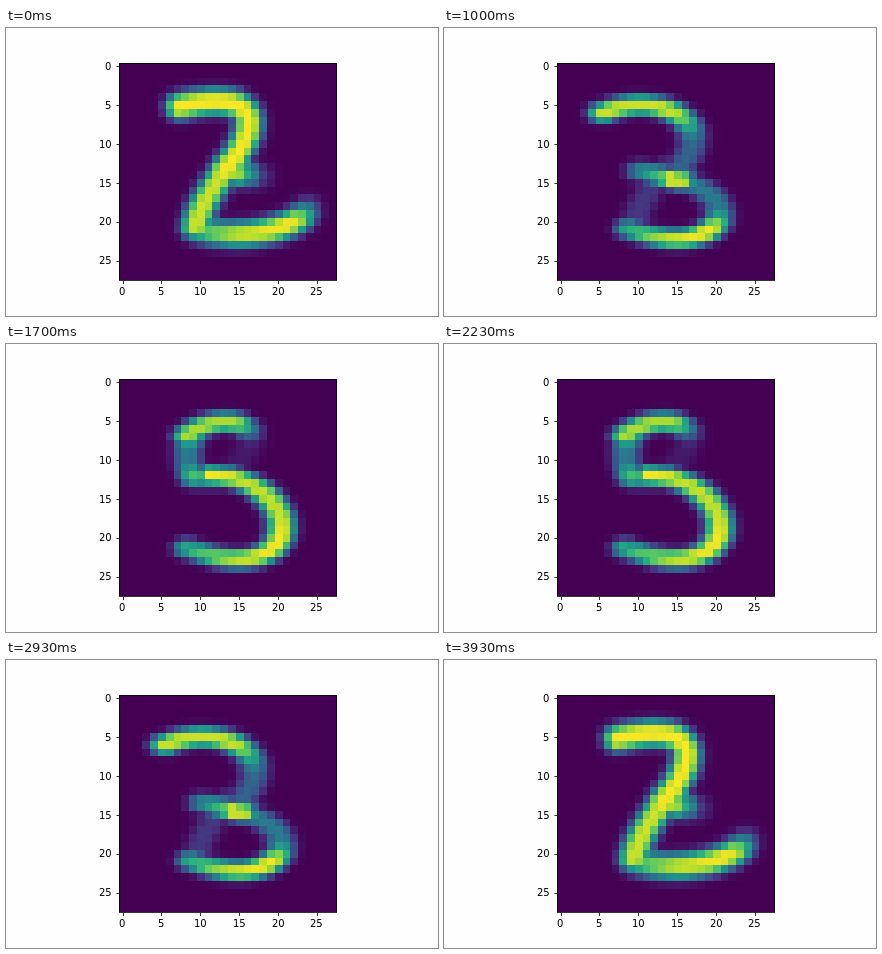
Write an HTML page with a canvas that moves like this. It is 432x288 px and loops after 4.03 s.

```html
<!DOCTYPE html>
<html lang="en">
<head>
<meta charset="utf-8">
<title>Digit morph</title>
<style>
  html, body { margin: 0; width: 100%; height: 100%; overflow: hidden; background: #fefefe; }
  canvas, svg { position: absolute; left: 0; top: 0; width: 432px; height: 288px; }
  text { font: 10px "DejaVu Sans", sans-serif; fill: #000; }
  rect { fill: #000; fill-opacity: .8; }
</style>
</head>
<body>
<canvas id="plot" width="432" height="288"></canvas>
<svg id="axes" viewBox="0 0 432 288"></svg>
<script>
const N = 28, LEFT = 113, TOP = 34, CELL = 218 / N;
const LOOP = 4030, STEP = 100, HALF = 10;

const mix = (a, b, p) => a + (b - a) * p;
const clamp = v => Math.max(0, Math.min(1, v));
const smooth = (from, to, v) => {
  const p = clamp((v - from) / (to - from));
  return p * p * (3 - 2 * p);
};

// Bezier points in grid cells; moving strokes have one set each for the 2, the 3 and the 5.
const strokes = [
  { // top arc, whose lower end fades
    poses: [
      [[7.3, 5.2], [17, 2.9], [18.5, 7], [13, 13.5]],
      [[5.4, 6], [13, 2.8], [21, 7.8], [14.5, 13.8]],
      [[8.6, 7], [12, 3.6], [20.5, 4.6], [13.8, 11]]],
    strength: (u, k) => mix(1, .85, k / 20) - Math.min(.8, .06 * k) * smooth(.4, .8, u)
  },
  { // bowl and foot, whose upper part fills in
    poses: [
      [[13.3, 13.5], [34, 16], [20, 23.8], [9.5, 21]],
      [[14.2, 14.5], [25, 16.5], [20.5, 25.5], [8.7, 20.9]],
      [[11, 11.7], [23.5, 12], [24.5, 27.5], [8.2, 21.4]]],
    strength: (u, k) => {
      const gap = 1 - clamp(k / 18) ** 1.5;
      return (1 - gap * smooth(0, .1, u) * (1 - smooth(.35, .6, u))) * (1 - .4 * u ** 8);
    }
  },
  { // middle bar
    poses: [
      [[12.8, 13.8], [13.2, 13.2]],
      [[10.2, 13.5], [15.4, 14.7]],
      [[9.1, 12.3], [13.5, 11.9]]],
    strength: u => mix(.45, .95, u)
  },
  { // leg of the 2
    poses: [[[13.5, 13], [10.2, 17.2], [9.3, 20.6]]],
    strength: (u, k) => .93 * (1 - (k / 11) ** 2)
  },
  { // stem of the 5
    poses: [[[8.7, 6.9], [7.7, 9.7], [9.1, 12.2]]],
    strength: (u, k) => (k / 10 - 1) * (1 - .45 * Math.sin(Math.PI * u))
  }
];

function pointsAt(poses, k) {
  if (poses.length === 1) return poses[0];
  const i = k < HALF ? 0 : 1;
  const p = Math.sin((k / HALF - i) * Math.PI / 2);
  return poses[i].map((a, n) => a.map((v, axis) => mix(v, poses[i + 1][n][axis], p)));
}

function bezier(pts, u) {
  while (pts.length > 1) {
    pts = pts.slice(1).map((b, n) => b.map((v, axis) => mix(pts[n][axis], v, u)));
  }
  return pts[0];
}

const SAMPLES = 40;
function dabs(k) {
  const out = [];
  for (const { poses, strength } of strokes) {
    const pts = pointsAt(poses, k);
    for (let n = 0; n <= SAMPLES; n++) {
      const u = n / SAMPLES, power = strength(u, k);
      if (power > 0) out.push([...bezier(pts, u), power]);
    }
  }
  return out;
}

const stops = ['440154', '472d7b', '3b528b', '2c728e', '21918c', '28ae80', '5ec962', 'addc30', 'fde725']
  .map(h => [0, 2, 4].map(i => parseInt(h.slice(i, i + 2), 16)));

function colour(v) {
  const s = clamp(v) * (stops.length - 1);
  const i = Math.min(stops.length - 2, Math.floor(s));
  return `rgb(${stops[i].map((c, n) => Math.round(mix(c, stops[i + 1][n], s - i)))})`;
}

const ctx = document.getElementById('plot').getContext('2d');
ctx.rect(113, 35, 218, 217);
ctx.clip();
const edge = (start, i) => Math.round(start + i * CELL);

function draw(k) {
  const ink = dabs(k);
  // A flat pen, wider than tall, that gets thinner on the way to the 3.
  const penX = 1.85, penY = mix(1.7, 1.25, clamp(k / HALF));
  for (let r = 0; r < N; r++) {
    const y = edge(TOP, r), h = edge(TOP, r + 1) - y;
    for (let c = 0; c < N; c++) {
      let v = 0;
      for (const [px, py, power] of ink) {
        const d2 = ((c - px) / penX) ** 2 + ((r - py) / penY) ** 2;
        v = Math.max(v, power * Math.exp(-(d2 ** 1.4)));
      }
      const x = edge(LEFT, c);
      ctx.fillStyle = colour(v);
      ctx.fillRect(x, y, edge(LEFT, c + 1) - x, h);
    }
  }
}

function buildAxes() {
  const bar = (x, y, w, h) => `<rect x="${x}" y="${y}" width="${w}" height="${h}"/>`;
  const label = (x, y, s) => `<text x="${Math.round(x)}" y="${Math.round(y)}">${s}</text>`;
  let out = bar(113, 35, 1, 218) + bar(330, 35, 1, 218) + bar(114, 35, 216, 1) + bar(114, 252, 216, 1);
  for (let v = 0; v <= 25; v += 5) {
    const along = (v + .5) * 217.44 / N, x = 112.68 + along, y = 34.56 + along;
    const width = 6.36 * String(v).length;
    out += bar(Math.round(x), 253, 1, 3) + bar(110.5, Math.round(y), 2.5, 1);
    out += label(x - width / 2, 267, v) + label(105.68 - width, y + 3.7, v);
  }
  document.getElementById('axes').innerHTML = out;
}

// Forward to the 5, held briefly, then back.
function stepAt(t) {
  return t < 2030 ? Math.floor(t / STEP) : Math.max(0, Math.ceil((3930 - t) / STEP));
}

let shown = -1;
const start = performance.now();
function tick() {
  const k = stepAt((performance.now() - start) % LOOP);
  if (k !== shown) draw(shown = k);
  requestAnimationFrame(tick);
}

buildAxes();
tick();
</script>
</body>
</html>
```
